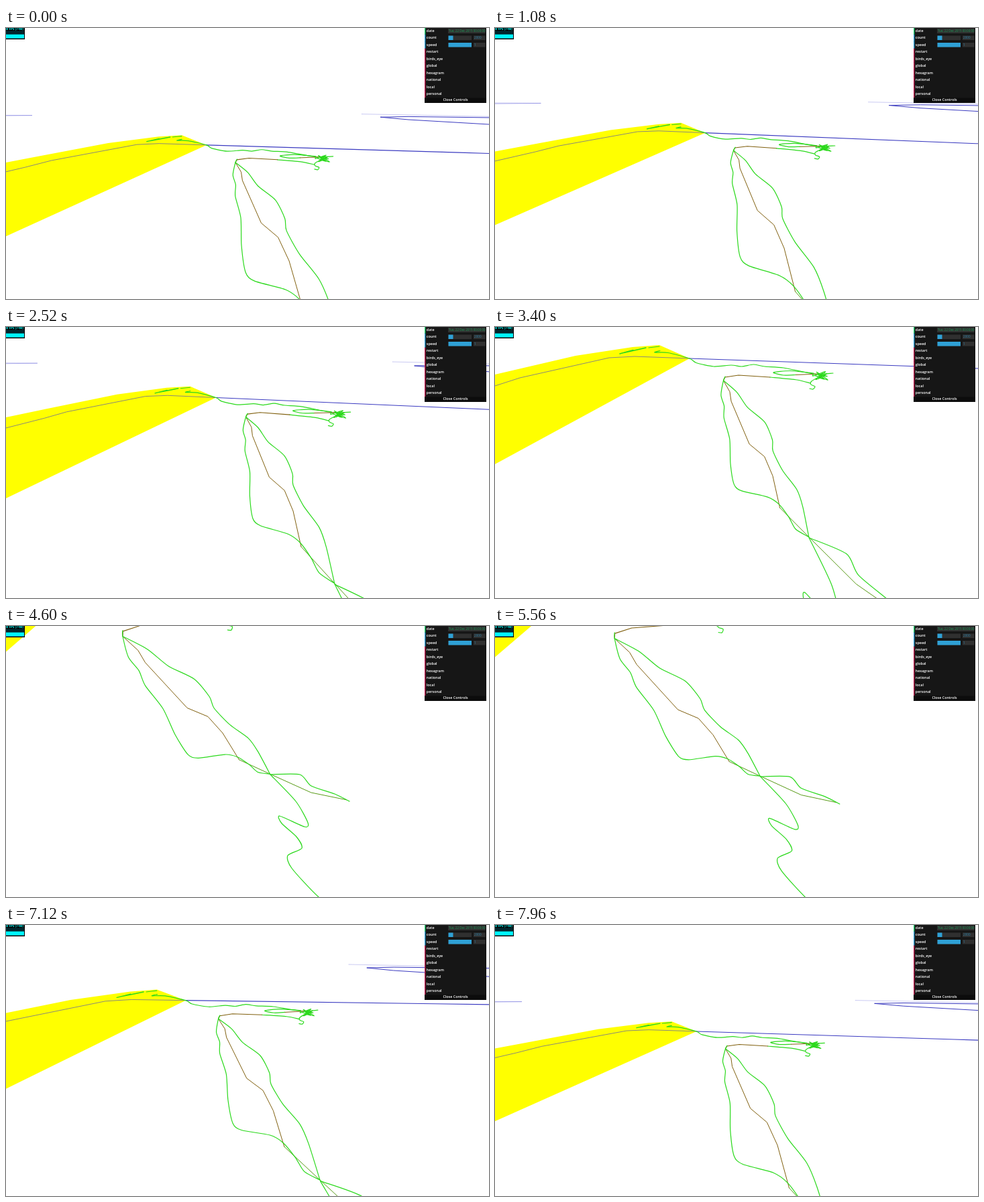
Animation of 720x405 px, one loop 8 s. Source, as an HTML page with a canvas:

```html
<!DOCTYPE html>
<html lang="en">
<head>
<meta charset="utf-8">
<title>Route map fly-over</title>
<style>
  html, body { margin: 0; width: 100%; height: 100%; overflow: hidden; background: #fff; }
  canvas { display: block; width: 720px; height: 405px; }
</style>
</head>
<body>
<canvas id="stage" width="720" height="405"></canvas>
<script>
const ctx = document.getElementById('stage').getContext('2d');
const LOOP = 8000, STEP = 40, MID_X = 360, MID_Y = 202.5;
const FOCAL = MID_Y / Math.tan(37.5 * Math.PI / 180);

// A level camera over flat ground is fixed by its horizon and two landmarks:
// [horizon y, trail apex x, y, trail bend x, y]
const START = [127, 342, 201, 422, 348];
const PAN = [109, 355.5, 183, 431, 329];
const TILT = [50, 357.5, 134.5, 428, 275];
const DIVE = [-22, 340.5, 80, 414, 222.5];
const NEAR = [-150, 174, 15.5, 323, 160];
const BACK = [-2, 282, 97, 375, 231];
const END = [111, 343.5, 185, 421, 329];
const keys = [[0, START], [1080, PAN], [2520, TILT], [3400, DIVE],
  [4600, NEAR], [5500, NEAR], [6400, BACK], [7960, END]];

// Ground points are complex numbers: the apex is 0 and the bend is 1.
const add = ([a, b], [c, d]) => [a + c, b + d];
const sub = ([a, b], [c, d]) => [a - c, b - d];
const mul = ([a, b], [c, d]) => [a * c - b * d, a * d + b * c];
const div = (p, [c, d]) => mul(p, [c, -d]).map(v => v / (c * c + d * d));

function camera([horizon, ax, ay, bx, by]) {
  const reach = Math.hypot(FOCAL, MID_Y - horizon);
  const view = (x, y) => [(x - MID_X) / (y - horizon), reach / (y - horizon)];
  const origin = view(ax, ay), axis = sub(view(bx, by), origin);
  return {
    lift: (x, y) => div(sub(view(x, y), origin), axis),
    see: point => add(origin, mul(axis, point)),
    screen: ([side, depth]) => [MID_X + side * reach / depth, horizon + reach / depth]
  };
}

// Cubic Hermite interpolation between the key poses.
function poseAt(t) {
  const last = keys.length - 1;
  let i = 0;
  while (i < last - 1 && t >= keys[i + 1][0]) i++;
  const [t0, from] = keys[i], [t1, to] = keys[i + 1];
  const span = t1 - t0, s = Math.min(1, (t - t0) / span);
  const ease = s * s * (3 - 2 * s);
  const slope = (k, j) => {
    const a = keys[Math.max(0, k - 1)], b = keys[Math.min(last, k + 1)];
    return (b[1][j] - a[1][j]) / (b[0] - a[0]);
  };
  return from.map((v, j) => v + (to[j] - v) * ease +
    span * s * (1 - s) * ((1 - s) * slope(i, j) - s * slope(i + 1, j)));
}

const GREEN = '#2bd91c', BROWN = '#80600f', OLIVE = '#589a16', BLUE = '#3a3ac0', PALE = 'rgba(90,90,215,.4)';
const shapes = [];

// Outlines are "x,y x,y" as seen from a pose; width 0 means filled.
function shape(pose, color, width, outline) {
  const { lift } = camera(pose);
  const points = outline.split(' ').map(p => lift(...p.split(',').map(Number)));
  shapes.push({ color, width, points });
}

// Yellow band and roads
shape(DIVE, '#ffff00', 0, '290,47 245,27 205,30 120,43 0,71 -400,166 -400,423');
shape(DIVE, '#8b8b78', 1, '-400,204 0,88 37,76 170,46 208,44 290,47');
shape(DIVE, BLUE, 1.1, '290,47 720,62 1500,89');
shape(START, BLUE, 1, '800,135 600,132.4 558,133.2 600,137 720,144 1100,167');
shape(START, PALE, 0.8, '530,128.6 760,133');
shape(START, PALE, 1, '-120,132.5 39,130.6 -120,130');

// Far trail
shape(DIVE, GREEN, 1.4, '186,40 206,34.5 192,38.5 225,31');
shape(DIVE, GREEN, 1.1, '229,31 245,29');
shape(DIVE, GREEN, 1.2, '246,35.5 238,38 258,38.5 290,47 300,53.5 326,59 352,57 368,59 385,56 402,59 430,61 475,70 504,69');
shape(DIVE, GREEN, 1.2, '410,75 450,79 470,84');
shape(DIVE, GREEN, 1.2, '448,71.5 430,72 415,68 440,65.5 475,69');
shape(DIVE, BROWN, 1, '448,71.5 484,70');
shape(DIVE, BROWN, 1.1, '340.5,80 343,75 363,72 410,75');

// Tangle at the far end
let seed = 11;
const random = () => (seed = seed * 16807 % 2147483647) / 2147483647;
const tangle = Array.from({ length: 16 }, (_, i) => {
  const x = (i % 2 ? 488 : 474) + 14 * random();
  return x + ',' + (66 + 16 * random());
});
shape(DIVE, GREEN, 1.2, '475,70 ' + tangle.join(' ') + ' 472,81 471,86 477,89 474,93 469,92');

// Near trail
shape(BACK, BROWN, 1, '282,97 294,113 298,127 334,188 359,204 375,231 392,277');
shape(BACK, OLIVE, 1, '392,277 439,313 512,368 586,404');
shape(BACK, GREEN, 1.2, '284,91 282,97 281,119 288,135 290,153 303,184 309,221 319,253 332,261 372,264 390,272 407,289 419,305 439,313');
shape(BACK, GREEN, 1.2, '282,97 305,113 324,134 352,153 367,178 370,194 388,221 412,246 424,270 439,313');
shape(NEAR, GREEN, 1.2, '394,222 438,222 455,239 490,251 512,262');
shape(NEAR, GREEN, 1.2, '394,222 432,262 450,294 445,300 408,284 411,295 433,315 441,332 420,343 426,362 466,405 510,437');

// Keep only the part in front of the camera.
function clip(points, closed) {
  const near = 0.15, out = [];
  points.forEach((p, i) => {
    const prev = i ? points[i - 1] : closed && points[points.length - 1];
    if (prev && (prev[1] > near) !== (p[1] > near)) {
      const k = (near - prev[1]) / (p[1] - prev[1]);
      out.push(prev.map((v, j) => v + k * (p[j] - v)));
    }
    if (p[1] > near) out.push(p);
  });
  return out;
}

// Smooth curve through the points.
function curve(points) {
  const at = i => points[Math.max(0, Math.min(points.length - 1, i))];
  points.forEach((p, i) => {
    if (!i) return ctx.moveTo(...p);
    const [before, prev, after] = [at(i - 2), at(i - 1), at(i + 1)];
    const lead = prev.map((v, j) => v + (p[j] - before[j]) / 8);
    const tail = p.map((v, j) => v - (after[j] - prev[j]) / 8);
    ctx.bezierCurveTo(...lead, ...tail, ...p);
  });
}

function drawShape({ color, width, points }, cam) {
  const seen = clip(points.map(cam.see), !width).map(cam.screen);
  ctx.beginPath();
  if (color === GREEN) curve(seen);
  else seen.forEach(p => ctx.lineTo(...p));
  ctx.fillStyle = ctx.strokeStyle = color;
  ctx.lineWidth = width || 1;
  if (width) ctx.stroke();
  else ctx.fill();
}

function box(color, x, y, w, h) {
  ctx.fillStyle = color;
  ctx.fillRect(x, y, w, h);
}

function label(text, x, y, color, font, align = 'left') {
  ctx.font = font + ' "Open Sans", sans-serif';
  ctx.fillStyle = color;
  ctx.textAlign = align;
  ctx.fillText(text, x, y);
}

function drawStats() {
  box('#000', 0, 0, 28, 17);
  box('#02252c', 0, 4, 27, 5);
  box('#00f4ff', 0, 9.5, 27, 6);
  label('60 FPS (7-60)', -2, 2, '#0ff', 'bold 4.6px');
}

const names = ['date', 'count', 'speed', 'restart', 'birds_eye', 'global', 'hexagram',
  'national', 'local', 'personal'];

function drawPanel() {
  const rowH = 10.5, blue = '#2fa1d6';
  box('#161616', 624, 0, 92, 112);
  names.forEach((name, i) => {
    box(i === 0 ? '#1ed36f' : i < 3 ? blue : '#c01c50', 624, i * rowH - 0.8, 1.4, rowH);
    label(name, 626.8, i * rowH + 4.5, '#fff', '600 5.4px');
  });
  box('#303030', 659, 1, 55.5, 7);
  label('Tue, 22 Dec 2015 00:00:00', 660, 4.5, '#1c9c58', '4.5px');
  [[7, '2000'], [34.5, '1']].forEach(([fill, value], i) => {
    const y = 11.5 + i * rowH;
    box('#303030', 659.5, y, 34.5, 6.5);
    box(blue, 659.5, y, fill, 6.5);
    box('#303030', 697, y, 17.5, 6.5);
    label(value, 698, y + 3.5, '#2b84ad', '4.6px');
  });
  box('#0c0c0c', 624, 104.5, 92, 7.5);
  label('Close Controls', 670, 108, '#fff', '600 5.4px', 'center');
}

function frame(now) {
  const t = Math.floor((now % LOOP) / STEP) * STEP;
  const cam = camera(poseAt(t));
  box('#fff', 0, 0, 720, 405);
  ctx.lineJoin = ctx.lineCap = 'round';
  ctx.textBaseline = 'middle';
  for (const s of shapes) drawShape(s, cam);
  drawStats();
  drawPanel();
  requestAnimationFrame(frame);
}
requestAnimationFrame(frame);
</script>
</body>
</html>
```
